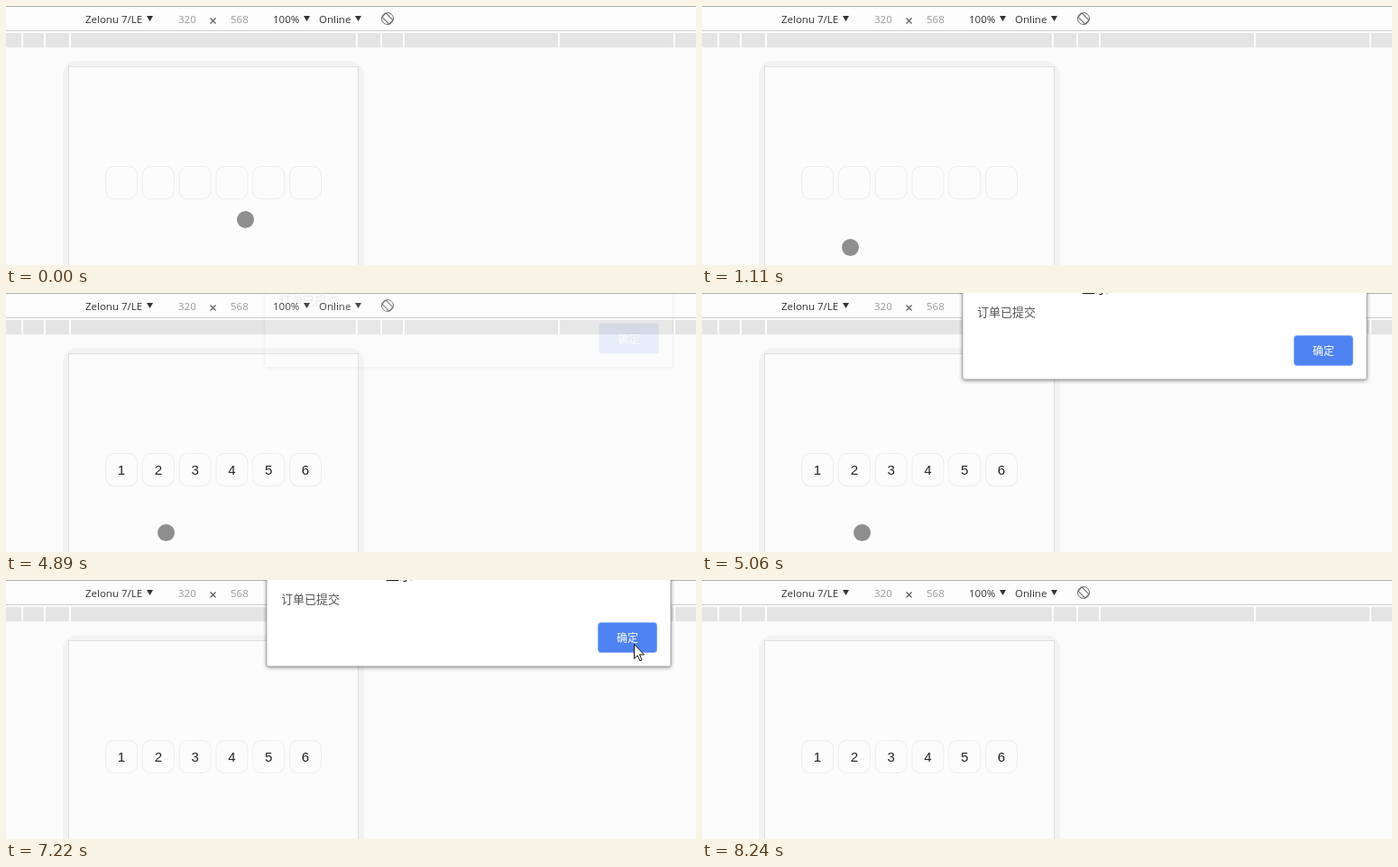
Write an HTML page that moves like this. It is 765 px wide and 288 px high and loops after 9.04 s.

```html
<!DOCTYPE html>
<html lang="zh">
<head>
<meta charset="utf-8">
<title>Code input demo</title>
<style>
  html, body { margin: 0; width: 100%; height: 100%; overflow: hidden; background: #fbfbfb; }
  svg { display: block; }
  .bar { font: 11.5px "Open Sans", "Noto Sans", sans-serif; fill: #333; }
  .bar .dim { fill: #999; }
  .digit { font: 15px "Liberation Sans", Arial, sans-serif; fill: #222; text-anchor: middle; }
  #dialog { font: 13px "Noto Sans CJK SC", "Noto Sans CJK", sans-serif; fill: #555; }
  #dialog .title { font-size: 15px; font-weight: 500; fill: #222; }
  #dialog .ok { font-size: 12px; font-weight: 500; fill: #fff; text-anchor: middle; }
  #panel { filter: drop-shadow(0 1px 2px rgba(0, 0, 0, .45)); }
</style>
</head>
<body>
<svg width="765" height="288" viewBox="0 0 765 288">
  <rect width="765" height="288" fill="#fbfbfb"/>
  <rect width="765" height="30" fill="#fdfdfd"/>
  <rect width="765" height="1" fill="#b0b0b0"/>
  <rect y="27" width="765" height="1" fill="#ccc"/>
  <rect y="30" width="765" height="16" fill="#e4e4e4"/>
  <g id="ruler" fill="#fdfdfd"></g>

  <g class="bar">
    <text x="88" y="19">Zelonu 7/LE</text>
    <text x="191" y="19" class="dim">320</text>
    <text x="249" y="19" class="dim">568</text>
    <text x="296" y="19">100%</text>
    <text x="347" y="19">Online</text>
    <path d="M156 11h7l-3.5 6zM330 11h7l-3.5 6zM387 11h7l-3.5 6z"/>
    <path d="M226.5 13.5l6 6m0-6l-6 6" stroke="#555" stroke-width="1.1"/>
  </g>
  <g fill="none" stroke="#666" transform="translate(423 14) rotate(-45)">
    <circle r="6.5" stroke-width=".9"/>
    <rect x="-3" y="-5.5" width="6" height="11" rx="1"/>
  </g>

  <rect x="63" y="61" width="334" height="260" rx="16" fill="#f3f3f3"/>
  <rect x="69.5" y="67.5" width="321" height="260" fill="#fcfcfc" stroke="#dedede"/>
  <g id="cells"></g>
  <circle id="touch" r="9.5" fill="#8e8e8e"/>

  <g id="dialog">
    <rect id="panel" x="289" y="-20" width="448" height="116" rx="2" fill="#fff" stroke="#999" stroke-width=".7"/>
    <text class="title" x="421" y="0">显示</text>
    <text x="305" y="26">订单已提交</text>
    <rect x="656.5" y="47.5" width="65" height="33" rx="3" fill="#4f83f3" stroke="#7fa5f7"/>
    <text class="ok" x="689" y="69">确定</text>
  </g>
  <path id="arrow" d="M.5 .5V16.5L4.2 13 6.8 18.8 9 17.8 6.5 12H11.5Z" fill="#fff" stroke="#111"/>
</svg>
<script>
const LOOP = 9040;
const CENTER = 230;
const BREAKPOINTS = [320, 375, 425, 768, 1024];
const CELL_STEP = 40.8;
const typedAt = [2810, 2910, 3090, 4150, 4330, 4580];
const $ = id => document.getElementById(id);
const clamp = v => Math.min(1, Math.max(0, v));

// Progress from 0 to 1 in equal jumps, the first one at `start`.
const steps = (t, start, every, count) =>
  clamp((Math.floor((t - start) / every) + 1) / count);

function touchAt(t) {
  const sweep = steps(t, 460, 43.75, 9);
  const drop = steps(t, 1050, 60, 2);
  const nudge = steps(t, 1980, 1, 1);
  const leave = steps(t, 5560, 40, 2);
  return [
    265.5 - 89 * sweep - 12 * drop + 13 * nudge + 28 * leave,
    237.5 - 23 * sweep + 54 * drop - 2 * nudge - 2 * leave
  ];
}

// Swings slightly past the button and back, then leaves downwards.
function arrowAt(t) {
  const enter = steps(t, 5919, 59, 11);
  const leave = steps(t, 7520, 60, 12);
  const swing = Math.sin(2.05 * enter ** 1.2) / Math.sin(2.05);
  const rise = 1 - (1 - enter) ** 1.5;
  return [480 + 216 * swing + 55 * leave, 189 - 118 * rise + 197 * leave].map(Math.round);
}

function dialogPresence(t) {
  const opening = steps(t, 4890, 56, 4) ** 1.6;
  const closing = clamp((t - 7380) / 120);
  return Math.min(opening, 1 - closing);
}

function place(node, [x, y], shown) {
  node.setAttribute("transform", `translate(${x} ${y})`);
  node.style.display = shown ? "" : "none";
}

$("ruler").innerHTML = BREAKPOINTS
  .flatMap(width => [CENTER - width / 2, CENTER + width / 2 - 2])
  .map(x => `<rect x="${Math.floor(x)}" y="30" width="2" height="16"/>`).join("");

$("cells").innerHTML = typedAt.map((_, i) => `
  <g transform="translate(${i * CELL_STEP})">
    <rect x="110.5" y="178.5" width="35" height="36" rx="9" fill="#fcfcfc" stroke="#ededed"/>
    <text class="digit" x="128" y="202">${i + 1}</text>
  </g>`).join("");
const digits = document.querySelectorAll(".digit");

function draw() {
  const t = performance.now() % LOOP;
  digits.forEach((digit, i) => digit.style.display = t >= typedAt[i] ? "" : "none");
  place($("touch"), touchAt(t), t < 5640);
  place($("arrow"), arrowAt(t), t >= 5860 && t < 8240);

  const presence = dialogPresence(t);
  const away = 1 - presence ** 3;
  const scale = 1 + .009 * away;
  $("dialog").setAttribute("opacity", presence);
  $("dialog").setAttribute("transform",
    `translate(${513 * (1 - scale)} ${-13.5 * away}) scale(${scale} 1)`);
  requestAnimationFrame(draw);
}
draw();
</script>
</body>
</html>
```
